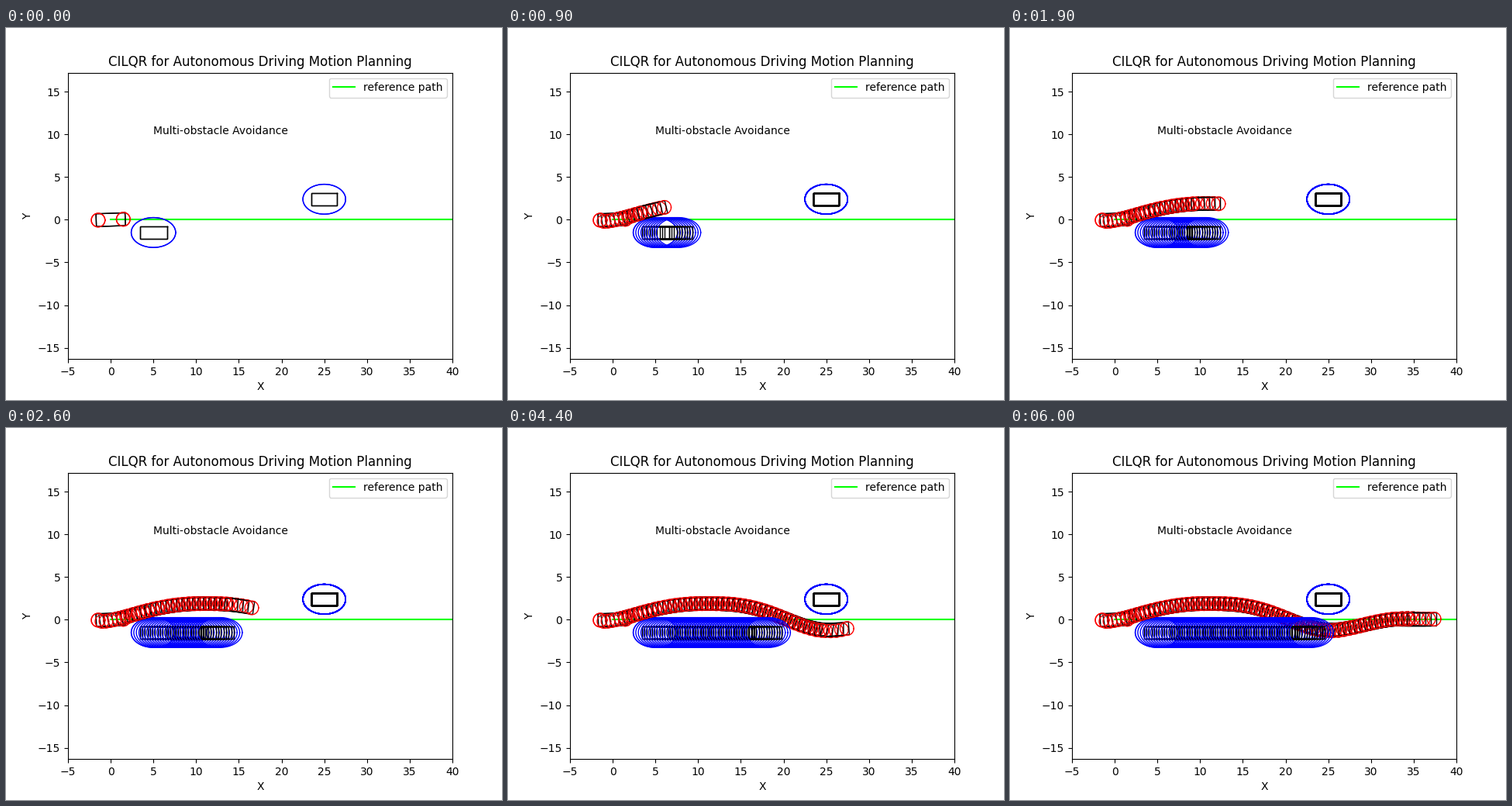
A matplotlib script that plays this animation: 640 by 480 pixels, repeating every 6.1 s.

```python
import numpy as np
import matplotlib.pyplot as plt
from matplotlib.animation import FuncAnimation

STEPS = 61
CRUISE, START_LAG, RAMP = 0.629, 1.1, 5.0    # car speed per step, slow start
OBSTACLE_SPEED = 0.3
CAR_HALF, AXLE, DISC = 1.7, 1.47, 0.8
HALF_WIDTH, MARGIN = 0.75, 1.0

# Turning points of the car's path as (x, y, skew of the swing leading there).
TURNS = [(0, 0, 1), (10.8, 1.86, 0.68), (25.3, -1.17, 1.385), (34.2, 0.08, 0.9)]


def build_path():
    """Sample the path: travelled distance, x, y and heading."""
    x = np.linspace(0, 40, 4001)
    y = np.full_like(x, TURNS[-1][1])
    for (x0, y0, _), (x1, y1, skew) in zip(TURNS, TURNS[1:]):
        part = (x >= x0) & (x <= x1)
        t = ((x[part] - x0) / (x1 - x0)) ** skew
        y[part] = y0 + (y1 - y0) * (1 - np.cos(np.pi * t)) / 2
    slope = np.gradient(y, x)
    distance = np.cumsum(np.hypot(1, slope)) * (x[1] - x[0])
    return distance - distance[0], x, y, np.arctan(slope)


DISTANCE, *PATH = build_path()


def car_pose(step):
    travelled = CRUISE * step - START_LAG * (1 - np.exp(-step / RAMP))
    return [np.interp(travelled, DISTANCE, values) for values in PATH]


fig, ax = plt.subplots(figsize=(6.4, 4.8), dpi=100)
ax.set_xlim(-5, 40)
half_height = 45 * 369.6 / 496 / 2           # equal scale on both axes
ax.set_ylim(0.45 - half_height, 0.45 + half_height)
ax.set_autoscale_on(False)
ax.set_title("CILQR for Autonomous Driving Motion Planning")
ax.set_xlabel("X")
ax.set_ylabel("Y")
ax.text(5, 10, "Multi-obstacle Avoidance")
ax.plot([0, 60], [0, 0], color="lime", label="reference path")
ax.legend(loc="upper right")

ANGLES = np.linspace(0, 2 * np.pi, 100)


def draw_box(x, y, half_length, heading=0.0):
    u = half_length * np.array([1, 1, -1, -1, 1])
    v = HALF_WIDTH * np.array([1, -1, -1, 1, 1])
    c, s = np.cos(heading), np.sin(heading)
    return ax.plot(x + c * u - s * v, y + s * u + c * v, "k", lw=1,
                   solid_joinstyle="miter")


def draw_oval(x, y, a, b, color):
    return ax.plot(x + a * np.cos(ANGLES), y + b * np.sin(ANGLES),
                   color=color, lw=1)


def draw_obstacle(x, y, half_length):
    return (draw_box(x, y, half_length)
            + draw_oval(x, y, half_length + MARGIN, HALF_WIDTH + MARGIN, "blue"))


def draw_step(step):
    x, y, heading = car_pose(step)
    lines = draw_box(x, y, CAR_HALF, heading)
    for offset in (AXLE, -AXLE):
        lines += draw_oval(x + offset * np.cos(heading),
                           y + offset * np.sin(heading), DISC, DISC, "red")
    lines += draw_obstacle(5 + OBSTACLE_SPEED * step, -1.5, 1.6)
    lines += draw_obstacle(25, 2.4, 1.5)
    return lines


# The starting pose is stroked twice; every later pose stays as a trail.
trail = [draw_step(0) + draw_step(0)]
trail += [draw_step(step) for step in range(1, STEPS)]


def update(frame):
    for step, lines in enumerate(trail):
        for line in lines:
            line.set_visible(step <= frame)
    return []


anim = FuncAnimation(fig, update, frames=STEPS, interval=100,
                     init_func=lambda: update(0), repeat=True,
                     repeat_delay=0, blit=False)
plt.show()
```
